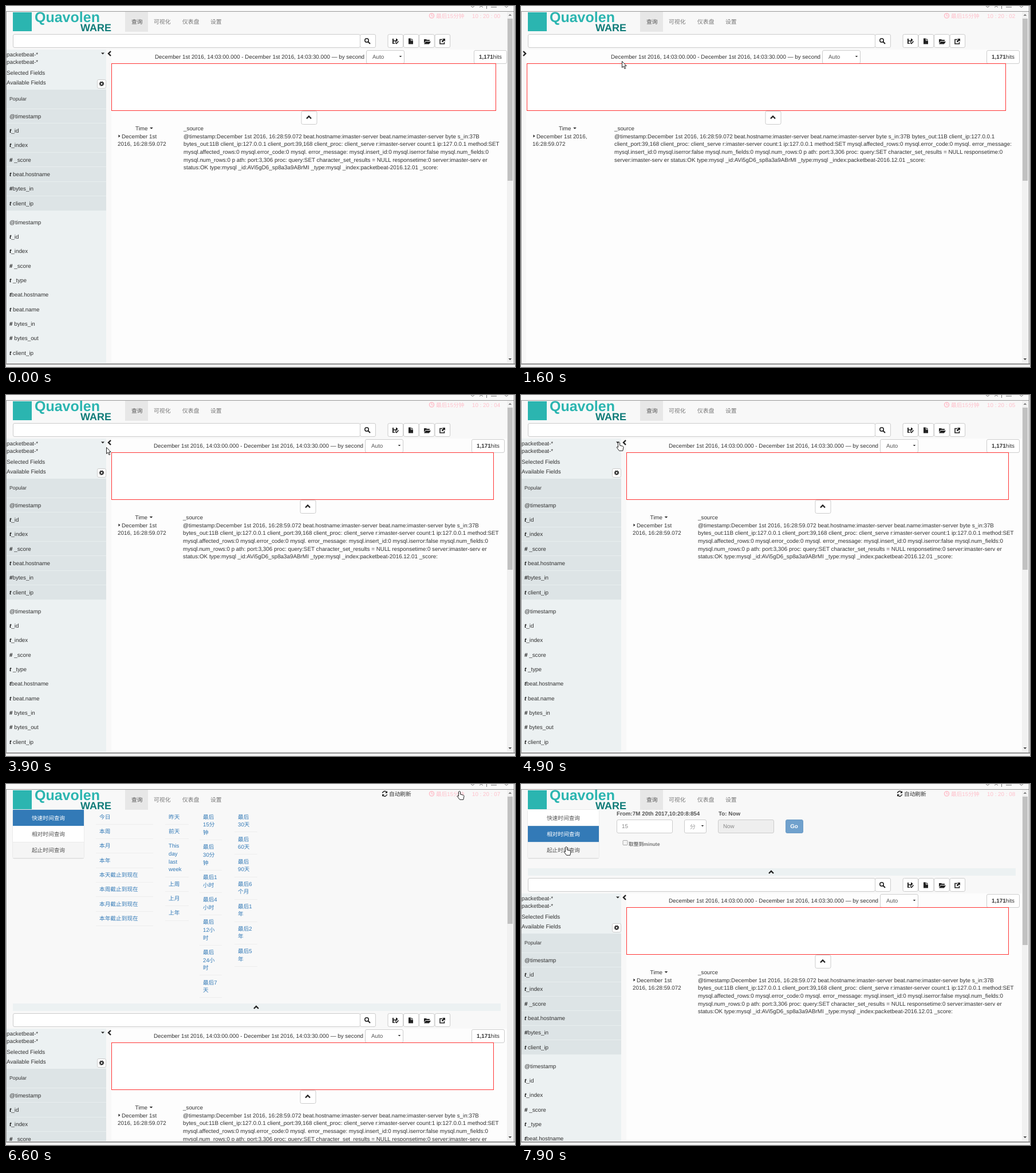
These frames come from a looping animation (889 px wide and 630 px high, 8000 ms). An HTML page:

```html
<!DOCTYPE html>
<html lang="zh">
<head>
<meta charset="utf-8">
<title>Log search</title>
<style>
  html, body { margin: 0; width: 100%; height: 100%; overflow: hidden; background: #fff; }
  svg { display: block; }
  text { font: 9.83px "Liberation Sans", "Noto Sans CJK SC", "Noto Sans CJK", sans-serif; fill: #333; white-space: pre; text-rendering: geometricPrecision; }
</style>
</head>
<body>
<svg id="stage" width="889" height="630" viewBox="0 0 889 630"></svg>
<script>
const LOOP = 8000, STEP = 100;
const BLUE = '#337ab7', DARK = '#222', PINK = '#ffc0cb', PANEL = '#ecf1f2', PAGE = '#f8f8f8';

function add(parent, tag, attrs = {}, content) {
  const node = document.createElementNS('http://www.w3.org/2000/svg', tag);
  for (const key in attrs) node.setAttribute(key, attrs[key]);
  if (content !== undefined) node.textContent = content;
  parent.append(node);
  return node;
}
const group = parent => add(parent, 'g');
const rect = (parent, x, y, width, height, fill, more) => add(parent, 'rect', { x, y, width, height, fill, ...more });
const box = (parent, x, y, w, h, fill = '#fff', stroke = '#ccc', rx = 2.5) =>
  rect(parent, x + .5, y + .5, w, h, fill, { stroke, rx });
const path = (parent, d, fill = DARK, more) => add(parent, 'path', { d, fill, ...more });
const line = (parent, d, width = 2, stroke = DARK) => path(parent, d, 'none', { stroke, 'stroke-width': width });
const label = (parent, x, middle, content, style = '', more) =>
  add(parent, 'text', { x, y: middle + 3.5, style, ...more }, content);
const show = (node, on) => node.setAttribute('display', on ? 'inline' : 'none');
const move = (node, x, y) => node.setAttribute('transform', `translate(${x} ${y})`);
const caret = (parent, x, y, size = 3) => path(parent, `M${x - size} ${y}h${2 * size}l${-size} ${size}z`);
const chevronUp = (parent, x, y) => line(parent, `M${x - 4} ${y + 2}l4-4 4 4`, 2.3);

const stage = document.getElementById('stage');
rect(stage, 0, 0, 889, 630, PAGE);

// Everything below the header slides down when the time picker opens.
const body = group(stage);
rect(body, 1, 76, 874, 900, '#fdfdfd');

const strip = group(body);
rect(strip, 12, 32, 852, 13, PANEL);
chevronUp(strip, 437, 39);

box(body, 12, 49, 606, 23);
box(body, 618, 49, 27, 23);
add(body, 'circle', { cx: 630, cy: 60, r: 3.2, fill: 'none', stroke: DARK, 'stroke-width': 1.6 });
line(body, 'M632.5 62.5l3.5 3.5', 2);
for (let i = 0; i < 4; i++) box(body, 666.5 + 27.4 * i, 49, 26.4, 23);
path(body, 'M675 57h2v3h4v-3h1.500l1.500 1.500v1.500l-3 3-1.500-1.500h-2.500v3.500h2l1 1h-5z');
line(body, 'M680 63.500l2 2 3.500-4', 1.6);
path(body, 'M703 56.500h4v4h4v6h-8zM708 56.500l3 3h-3z');
path(body, 'M730 58h4l1 1h5v2h-7l-3 4zM733 62h9l-3 4.500h-9z');
line(body, 'M762 58.500h-4v7.500h7.500v-3', 1.6);
path(body, 'M762 57h5v5l-1.600-1.600-3 3-1.800-1.800 3-3z');

// Sidebar
const sidebar = group(body);
rect(sidebar, 1, 76, 174, 900, PANEL);
label(sidebar, 1, 84, 'packetbeat-*');
caret(sidebar, 169, 81.5);
label(sidebar, 1, 97.5, 'packetbeat-*');
const indexRow = label(sidebar, 6, 115, 'packetbeat-*');

const fields = group(sidebar);
label(fields, 1, 116, 'Selected Fields');
label(fields, 1, 133, 'Available Fields');
box(fields, 159, 128, 15, 15);
add(fields, 'circle', { cx: 167, cy: 135.7, r: 2.4, fill: 'none', stroke: DARK, 'stroke-width': 1.8 });
add(fields, 'circle', { cx: 167, cy: 135.7, r: 3.8, fill: 'none', stroke: DARK, 'stroke-width': 1.2, 'stroke-dasharray': '1.5 1.48' });
rect(fields, 1, 146, 174, 211, '#dde4e6');
label(fields, 6, 161.5, 'Popular', 'font-size:8.7px');

function fieldList(names, top, ruled) {
  names.forEach((name, i) => {
    const y = top + 25.37 * i;
    if (ruled) rect(fields, 1, Math.round(y - 13), 174, 1, '#e8eeef');
    if (name[0] === '@') return label(fields, 6, y, name);
    const text = label(fields, 6, y, '');
    add(text, 'tspan', { style: 'font-weight:bold;fill:#111' + (name[0] === 't' ? ';font-style:italic' : '') }, name[0]);
    add(text, 'tspan', {}, name.slice(1));
  });
}
fieldList(['@timestamp', 't_id', 't_index', '# _score', 't beat.hostname', '#bytes_in', 't client_ip'], 192, true);
fieldList(['@timestamp', 't_id', 't_index', '# _score', 't _type', 'tbeat.hostname', 't beat.name', '# bytes_in',
  '# bytes_out', 't client_ip'], 377, false);

const openEdge = rect(body, 175, 76, 9, 900, PAGE);
const openArrow = line(body, 'M183 79l-4 4 4 4', 2.4);
const closedEdge = rect(body, 1, 76, 8, 900, PAGE);
const closedArrow = line(body, 'M4 79l4 4-4 4', 2.4);

// Results: "|" breaks lines beside the sidebar, "/" breaks them at full width.
const RECORD = '@timestamp:December 1st 2016, 16:28:59.072 beat.hostname:imaster-server beat.name:imaster-server byte s_in:37B|' +
  'bytes_out:11B client_ip:127.0.0.1/client_port:39,168 client_proc: client_serve r:imaster-server count:1 ip:127.0.0.1 method:SET|' +
  'mysql.affected_rows:0 mysql.error_code:0 mysql. error_message:/mysql.insert_id:0 mysql.iserror:false mysql.num_fields:0|' +
  'mysql.num_rows:0 p ath: port:3,306 proc: query:SET character_set_results = NULL responsetime:0/server:imaster-serv er|' +
  'status:OK type:mysql _id:AVi5gD6_sp8a3a9ABrMI _type:mysql _index:packetbeat-2016.12.01 _score:';

function results({ title, hits, left, right, toggle, time, date, source, wide }) {
  const g = group(body);
  label(g, title, 88, 'December 1st 2016, 14:03:00.000 - December 1st 2016, 14:03:30.000 — by second');
  box(g, title + 369, 77, 66, 23);
  label(g, title + 380, 88.5, 'Auto', 'fill:#555');
  caret(g, title + 429, 87, 2.3);
  box(g, hits, 77, 57, 23);
  const count = label(g, hits + 9, 88.5, '');
  add(count, 'tspan', { 'font-weight': 'bold' }, '1,171');
  add(count, 'tspan', {}, 'hits');
  rect(g, left + .5, 100.5, right - left - 1, 82, '#fff', { stroke: '#f33' });
  box(g, toggle - 13.5, 183, 27, 23);
  chevronUp(g, toggle, 194.5);
  label(g, time, 213, 'Time');
  caret(g, time + 28, 212, 2.8);
  label(g, source, 213, '_source');
  path(g, `M${date + 1.5} 224.500l3 2.500-3 2.500z`);
  const when = wide ? ['December 1st 2016,', '16:28:59.072'] : ['December 1st', '2016, 16:28:59.072'];
  label(g, date + 7, 227, when[0]);
  label(g, date, 240.5, when[1]);
  const [split, join] = wide ? ['/', '|'] : ['|', '/'];
  RECORD.replaceAll(join, ' ').split(split).forEach((row, i) => label(g, source, 227 + 13.7 * i, row));
  return g;
}
const layouts = [
  results({ title: 260, hits: 817, left: 184, right: 856, toggle: 529, time: 226, date: 195, source: 310 }),
  results({ title: 157, hits: 813, left: 10, right: 847, toggle: 440, time: 66, date: 20, source: 163, wide: true }),
  results({ title: 258, hits: 813, left: 184, right: 852, toggle: 527, time: 225.5, date: 195, source: 309 }),
];

// Time picker
const picker = group(stage);
box(picker, 11.5, 44.5, 124, 85, '#fff', '#ddd');
const tabs = ['快速时间查询', '相对时间查询', '起止时间查询'].map((name, i) => {
  const y = 45 + 28.2 * i;
  return {
    back: rect(picker, 12, y, 124, 28.2, BLUE),
    rule: rect(picker, 12, Math.round(y + 28), 124, 1, '#ddd'),
    text: label(picker, 74, y + 14, name, 'font-size:9.7px', { 'text-anchor': 'middle' }),
  };
});

const quick = group(picker);
[
  [163, 94, '今日 本周 本月 本年 本天截止到现在 本周截止到现在 本月截止到现在 本年截止到现在'],
  [284, 35, '昨天 前天 This|day|last|week 上周 上月 上年'],
  [344, 33, '最后|15分|钟 最后|30分|钟 最后1|小时 最后4|小时 最后|12小|时 最后|24小|时 最后7|天'],
  [405, 34, '最后|30天 最后|60天 最后|90天 最后6|个月 最后1|年 最后2|年 最后5|年'],
].forEach(([x, width, items]) => {
  let y = 57;
  for (const item of items.split(' ')) {
    for (const row of item.split('|')) {
      label(quick, x, y, row, `fill:${BLUE};font-size:9.7px`);
      y += 13.7;
    }
    rect(quick, x - 6, Math.round(y - 1), width + 6, 1, '#eee');
    y += 11.65;
  }
});

const relative = group(picker);
const bold = 'font-weight:bold;fill:#555';
label(relative, 167, 51.5, 'From:7M 20th 2017,10:20:8:854', bold);
label(relative, 345, 51.5, 'To: Now', bold);
box(relative, 167, 62, 97, 23);
label(relative, 176, 73.5, '15', 'fill:#888');
box(relative, 285, 62, 38, 23);
label(relative, 295, 74, '分', 'fill:#999');
caret(relative, 317, 72, 2.3);
box(relative, 344, 62, 97, 23, '#eee');
label(relative, 353, 73.5, 'Now', 'fill:#888');
box(relative, 462, 62, 30, 23, '#70a1cd', '#6b9bc6');
label(relative, 477, 73.5, 'Go', 'font-weight:bold;fill:#fff', { 'text-anchor': 'middle' });
box(relative, 177.5, 98, 8, 8, '#f4f4f4', '#aaa', 1);
label(relative, 188, 104, '取整到minute', 'font-weight:bold;fill:#777;font-size:8.7px');

label(picker, 669, 17, '自动刷新', 'font-size:9.7px');
line(picker, 'M657.500 16a4 4 0 0 1 7-2M665.500 18a4 4 0 0 1-7 2', 1.5);
path(picker, 'M666 12v4h-4zM657 22v-4h4z');

// Header
rect(stage, 12, 11, 33, 33, '#2bb5b0');
label(stage, 50, 24, 'Quavolen', 'font-size:25px;font-weight:bold;fill:#2bb5b0');
label(stage, 130, 40, 'WARE', 'font-size:18px;font-weight:bold;fill:#0f7b78');
rect(stage, 208, 10, 40, 35, '#e7e7e7');
[[219, '查询', '#555'], [258, '可视化', '#777'], [308, '仪表盘', '#777'], [357, '设置', '#777']]
  .forEach(([x, name, fill]) => label(stage, x, 27.5, name, `fill:${fill}`));
add(stage, 'circle', { cx: 743.5, cy: 17, r: 4, fill: 'none', stroke: PINK, 'stroke-width': 1.6 });
line(stage, 'M743.500 14v3.500h2.500', 1.2, PINK);
label(stage, 751, 17, '最后15分钟', `fill:${PINK};font-size:9.7px`);
const clock = label(stage, 814, 17, '', `fill:${PINK}`);

// Window frame and scrollbar
rect(stage, 0, 0, 889, 9, '#fafafa');
rect(stage, 0, 9, 887, 1, '#999');
line(stage, 'M839.500 0v5M812 0l3 2.500 3-2.500M827 2.500l3-2.500 3 2.500M847 2h10M871 0l3 2.500 3-2.500', 1, '#777');
rect(stage, 875, 10, 12, 614, '#f1f1f1');
const thumb = rect(stage, 876, 22, 9, 283, '#c1c1c1');
path(stage, 'M877.500 17l2.800-3 2.800 3z', '#777');
path(stage, 'M877.500 615l2.800 3 2.800-3z', '#444');
rect(stage, 0, 623, 889, 7, '#f3f3f3');
rect(stage, 0, 624, 889, 1.5, '#777');
rect(stage, 0, 9, 1, 616, '#999');
rect(stage, 887, 0, 1, 625, '#777');
rect(stage, 888, 0, 1, 624, '#fff');

const outline = { stroke: DARK, 'stroke-width': 1, 'stroke-linejoin': 'round' };
const arrow = path(stage, 'M.5 .5v11l2.500-2.300 2 4.300 1.800-.8-2-4.200h3.400z', '#fff', outline);
const hand = path(stage, 'M-1.500 1.500q1.500-2 3 0v4.500l5 1.300q1.500.500 1.500 2l-1.200 6h-6.300l-4.500-6q.500-1.800 2.500 0z', '#fff', outline);

// Pointer keys: time, x, y, hand shape until the next key
const POINTER = [
  [200, 741, 119, 0], [300, 398, 152, 0], [500, 304, 114, 0], [600, 251, 109, 0], [800, 183, 111, 0],
  [1000, 171, 96, 0], [1100, 178, 96, 1], [1500, 178, 96, 0], [1600, 176, 96, 0], [1800, 129, 108, 0],
  [2000, 77, 113, 0], [2200, 28, 101, 0], [2300, 6, 96, 1], [3300, 6, 96, 0], [3400, 6, 96, 0],
  [3600, 228, 106, 0], [3700, 219, 105, 0], [3800, 204, 121, 0], [3900, 175, 91, 0], [4200, 171, 82, 1],
  [5100, 171, 82, 0], [5600, 260, 60, 0], [5700, 260, 60, 0], [6400, 792, 12, 1], [6600, 792, 12, 1],
  [7100, 95, 69, 1], [7200, 95, 69, 1], [7500, 80, 86, 1], [7700, 80, 86, 1], [7900, 79, 109, 1], [8000, 79, 109, 1],
];
function pointerAt(t) {
  const i = POINTER.findLastIndex(key => key[0] <= t);
  if (i < 0) return null;
  const [t0, x0, y0, isHand] = POINTER[i], [t1, x1, y1] = POINTER[i + 1];
  const k = (t - t0) / (t1 - t0);
  return { x: x0 + (x1 - x0) * k, y: y0 + (y1 - y0) * k, isHand: !!isHand };
}

function render(t) {
  const layout = t < 1500 ? 0 : t < 3200 ? 1 : 2;
  const collapsed = layout === 1;
  const listOpen = t >= 4400 && t < 4900;
  const tab = t < 6600 ? -1 : t < 7700 ? 0 : 1;
  const pointer = pointerAt(t);

  layouts.forEach((node, i) => show(node, i === layout));
  [sidebar, openEdge, openArrow].forEach(node => show(node, !collapsed));
  [closedEdge, closedArrow].forEach(node => show(node, collapsed));
  show(indexRow, listOpen);
  move(fields, 0, listOpen ? 25.4 : 0);

  const edgeLeft = collapsed ? 0 : 175;
  const hover = pointer?.isHand && pointer.y > 90 && pointer.x > edgeLeft && pointer.x < edgeLeft + 9;
  (collapsed ? closedEdge : openEdge).setAttribute('fill', hover && tab < 0 ? '#dde4e6' : PAGE);

  move(body, 0, [0, 351, 115][tab + 1]);
  show(strip, tab >= 0);
  show(picker, tab >= 0);
  show(quick, tab === 0);
  show(relative, tab === 1);
  tabs.forEach(({ back, rule, text }, i) => {
    back.setAttribute('fill', i === tab ? BLUE : i === 2 ? '#f5f5f5' : '#fff');
    show(rule, i !== tab);
    text.style.fill = i === tab ? '#fff' : '#555';
  });
  thumb.setAttribute('height', listOpen ? 278 : [283, 222, 259][tab + 1]);

  const seconds = Math.max(0, Math.floor((t - 550) / 930) + 1);
  clock.textContent = `10 : 20 : 0${seconds}`;

  show(arrow, pointer && !pointer.isHand);
  show(hand, pointer && pointer.isHand);
  if (pointer) move(pointer.isHand ? hand : arrow, pointer.x, pointer.y);
}

function frame(now) {
  render(Math.floor((now % LOOP) / STEP) * STEP);
  requestAnimationFrame(frame);
}
render(0);
requestAnimationFrame(frame);
</script>
</body>
</html>
```
